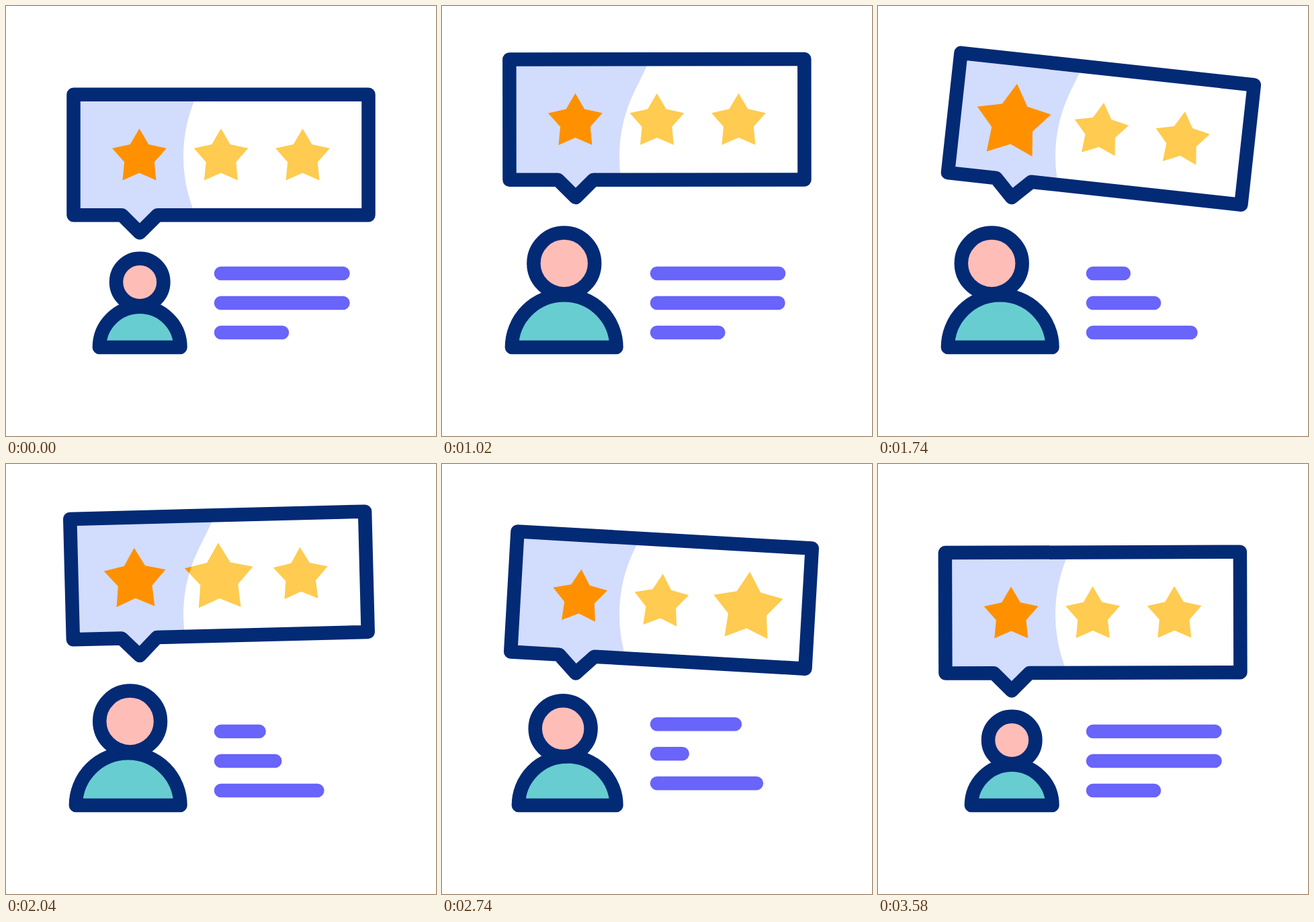
These frames come from a looping animation (640x640 px, 3.6 s). An HTML page:

```html
<!DOCTYPE html>
<html lang="en">
<head>
<meta charset="utf-8">
<title>Customer review</title>
<style>
  html, body { margin: 0; width: 100%; height: 100%; overflow: hidden; background: #fff; }
  svg { display: block; width: 100vw; height: 100vh; }
  .ink, .line, .dash { stroke-width: 20.5; stroke-linejoin: round; stroke-linecap: round; }
  .ink { stroke: #032a75; }
  .line { stroke: #6964fa; }
  .dash { stroke: #ff6250; }
</style>
</head>
<body>
<svg viewBox="0 0 640 640">
  <defs>
    <path id="shape" d="M100.5 131.8H539.5V311.2H225.4L199 337.6L172.6 311.2H100.5Z"/>
    <!-- The tinted area stays put while the bubble moves through it -->
    <clipPath id="tint"><path d="M0 0H348.7L286.5 127A220 220 0 0 0 286.5 321L348.7 448H0Z"/></clipPath>
  </defs>
  <g class="bubble"><use href="#shape" fill="#fff"/><g class="stars" fill="#ffcb50"></g></g>
  <g clip-path="url(#tint)">
    <g class="bubble"><use href="#shape" fill="#d2dcfd"/><g class="stars" fill="#ff9100"></g></g>
  </g>
  <g class="bubble"><use href="#shape" class="ink" fill="none"/><g id="dashes"></g></g>
  <path id="body" class="ink" fill="#67cdd1"/>
  <circle id="head" class="ink" fill="#ffbdb8"/>
  <g id="lines"></g>
</svg>
<script>
const LOOP = 3600, BEAT = 400, BOUNCE = 270;
const LEFT = -1, MIDDLE = 0, RIGHT = 1;
const SIDES = [LEFT, MIDDLE, RIGHT];
const $ = s => document.querySelector(s);
const $$ = s => [...document.querySelectorAll(s)];

function set(el, attrs) {
  for (const k in attrs) el.setAttribute(k, attrs[k]);
}
function add(parent, tag, attrs) {
  const el = document.createElementNS('http://www.w3.org/2000/svg', tag);
  set(el, attrs);
  return parent.appendChild(el);
}

// 0 to 1 between two times, slow at both ends
function ease(t, from, to) {
  const p = Math.min(1, Math.max(0, (t - from) / (to - from)));
  return p * p * (3 - 2 * p);
}
// Up for one beat, down for the next
const pulse = (t, start) =>
  ease(t, start, start + BEAT) - ease(t, start + BEAT, start + 2 * BEAT);
// Eased walk through evenly spaced values
const walk = (t, start, gap, values) => values.reduce((v, next, i) =>
  i ? v + (next - values[i - 1]) * ease(t, start + (i - 1) * gap, start + i * gap) : next);

function starPoints(cx, cy) {
  return Array.from({ length: 10 }, (_, i) => {
    const r = i % 2 ? 23.5 : 42.5, a = i * Math.PI / 5;
    return (cx + r * Math.sin(a)).toFixed(2) + ',' + (cy - r * Math.cos(a)).toFixed(2);
  }).join(' ');
}

// Line lengths on each beat
const LENGTHS = [
  [181.5, 138, 40, 65.5, 104, 146, 181.5],
  [181.5, 60, 93, 73.5, 15.5, 93.5, 181.5],
  [91, 137.5, 146, 142, 157.5, 124, 91]
];

const bubbles = $$('.bubble');
const starSets = $$('.stars').map(g =>
  SIDES.map(side => add(g, 'polygon', { points: starPoints(320 + 121.5 * side, 225) })));
const dashes = SIDES.map(() => add($('#dashes'), 'line', { class: 'dash' }));
const lines = LENGTHS.map((_, i) =>
  add($('#lines'), 'line', { class: 'line', x1: 320, y1: 398 + 44 * i, y2: 398 + 44 * i }));

const tiltAt = t => walk(t, 1000, BEAT, [0, -6, 7, -6, 7, -6, -0.18]);

function drawBubble(t) {
  const rise = 52.5 * ease(t, 200, 1000) + walk(t, 2600, BOUNCE, [0, -49.5, 0, -52.5]);
  const move = `translate(0 ${-rise}) rotate(${tiltAt(t)} 199 337.6)`;
  bubbles.forEach(b => set(b, { transform: move }));

  const tip = ease(t, 400, 800), tail = ease(t, 600, 1000);
  SIDES.forEach((side, i) => {
    const scale = 1 + 0.267 * pulse(t, 200) + 0.39 * pulse(t, 1400 + i * BEAT);
    const ax = 320 + 94.5 * side;
    const transform = `translate(${ax} 221) scale(${scale}) translate(${-ax} -221)`;
    starSets.forEach(list => set(list[i], { transform }));

    const outer = Math.abs(side);
    const x = 319.5 + 172.5 * side, y = 133 + 41.2 * outer;
    const dx = 18.5 * side, dy = 6.5 * outer - 24;
    set(dashes[i], {
      x1: x + dx * tail, y1: y + dy * tail, x2: x + dx * tip, y2: y + dy * tip,
      visibility: tip - tail > 0.001 ? 'visible' : 'hidden'
    });
  });
}

function drawPerson(t) {
  const up = ease(t, 200, 1000);
  const grow = up - ease(t, 2600, 3000), head = up - ease(t, 2600, 2933);
  const nod = t < 2600 ? -2 * tiltAt(t) : walk(t, 2600, BOUNCE, [-14, 0, -9.3, 0]);
  const r = 60.3 + 17.5 * grow, right = 259.5;
  set($('#body'), { d: `M${right - 2 * r} 508.1A${r} ${r} 0 0 1 ${right} 508.1Z` });
  set($('#head'), { cx: right - r + nod, cy: 411 - 28 * head, r: 35.2 + 10.2 * head });
}

function drawLines(t) {
  const turn = -10 * pulse(t, 200), lift = 37.4 * pulse(t, 2600);
  set($('#lines'), { transform: `translate(0 ${-lift}) rotate(${turn} 213 469)` });
  lines.forEach((l, i) => set(l, { x2: 320 + walk(t, 1000, BEAT, LENGTHS[i]) }));
}

function draw(t) {
  drawBubble(t);
  drawPerson(t);
  drawLines(t);
}

const begin = performance.now();
function frame() {
  draw((performance.now() - begin) % LOOP);
  requestAnimationFrame(frame);
}
draw(0);
requestAnimationFrame(frame);
</script>
</body>
</html>
```
